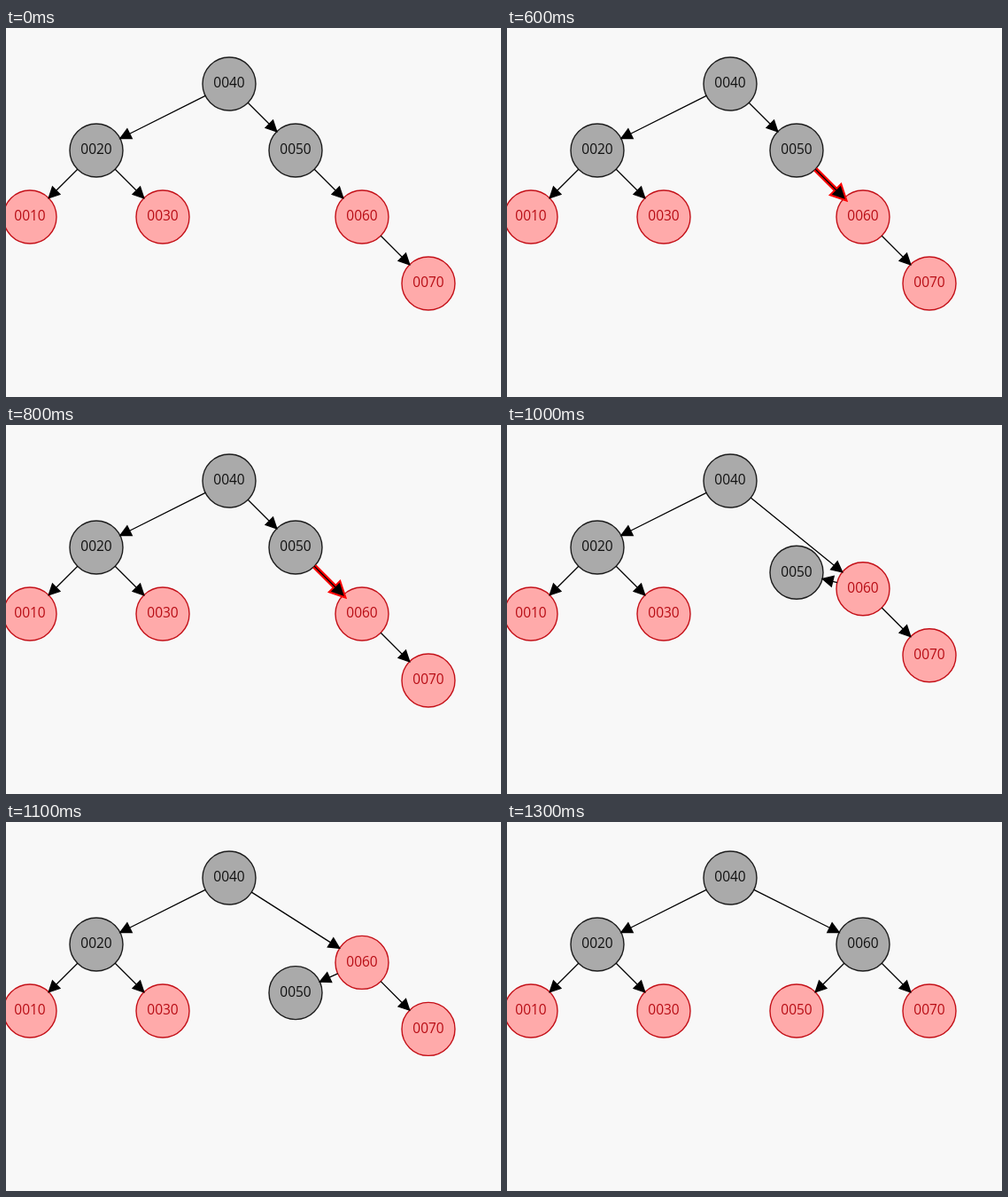
Write an HTML page that moves like this. It is 559 by 416 pixels and loops after 2200 ms.

```html
<!DOCTYPE html>
<html lang="en">
<head>
<meta charset="utf-8">
<title>Tree rotation</title>
<style>
  html, body { margin: 0; width: 100%; height: 100%; overflow: hidden; background: #f8f8f8; }
  svg { display: block; width: 559px; height: 416px; }
  text { font: 15.5px "Open Sans", "Noto Sans", sans-serif; fill: #111; }
  .node text { text-anchor: middle; }
  .node circle { fill: #aaa; stroke: #1c1c1c; stroke-width: 1.4; }
  .node.red circle { fill: #ffaaaa; stroke: #c41018; }
  .node.red text { fill: #b80c14; }
  .edge { fill: #000; stroke: #000; stroke-width: 1.3; }
  .glow { fill: #f00; stroke: #f00; stroke-width: 5.5; }
  #message { font-size: 14.5px; }
</style>
</head>
<body>
<svg id="stage" viewBox="0 0 559 416">
  <text id="message" x="-0.8" y="14.5">hild</text>
</svg>
<script>
const LOOP = 2200, TICK = 100;
const MESSAGE_ON = 200, GLOW_ON = 600, ROTATE = 817, ROTATE_TIME = 435, RECOLOR = 1300;
const RADIUS = 30, LEVEL = 75, HEAD = 12, HEAD_HALF = 6;

const stage = document.getElementById('stage');
const message = document.getElementById('message');

function add(parent, tag, attrs) {
  const el = document.createElementNS('http://www.w3.org/2000/svg', tag);
  for (const key in attrs) el.setAttribute(key, attrs[key]);
  return parent.appendChild(el);
}

// value: x, y, levels moved by the rotation, red
const nodes = {};
function addNode(value, x, y, levels, red) {
  const el = add(stage, 'g', { class: 'node' });
  add(el, 'circle', { r: RADIUS });
  add(el, 'text', { y: 4.3 }).textContent = '00' + value;
  nodes[value] = { el, x, y, top: y, levels, red };
}
addNode(40, 252, 63, 0, false);
addNode(20, 102, 138, 0, false);
addNode(10, 27, 213, 0, true);
addNode(30, 177, 213, 0, true);
addNode(50, 327, 138, 1, false);
addNode(60, 402, 213, -1, true);
addNode(70, 477, 288, -1, true);

const glow = add(stage, 'path', { class: 'glow' });
const fixedEdges = [[40, 20], [20, 10], [20, 30], [60, 70]];
const edgesBefore = [...fixedEdges, [40, 50], [50, 60]];
const edgesAfter = [...fixedEdges, [40, 60], [60, 50]];
const edgePaths = edgesBefore.map(() => add(stage, 'path', { class: 'edge' }));

function arrow([from, to]) {
  const a = nodes[from], b = nodes[to];
  const dist = Math.hypot(b.x - a.x, b.y - a.y);
  const ux = (b.x - a.x) / dist, uy = (b.y - a.y) / dist;
  const point = (along, side) =>
    `${(a.x + ux * along - uy * side).toFixed(2)} ${(a.y + uy * along + ux * side).toFixed(2)}`;
  const tip = dist - RADIUS, base = tip - HEAD;
  return `M${point(RADIUS, 0)}L${point(base, 0)}` +
    `M${point(tip, 0)}L${point(base, HEAD_HALF)}L${point(base, -HEAD_HALF)}Z`;
}

function draw(time) {
  const progress = Math.min(1, Math.max(0, (time - ROTATE) / ROTATE_TIME));
  const eased = (1 - Math.cos(Math.PI * progress)) / 2;
  const recolored = time >= RECOLOR;

  for (const value in nodes) {
    const node = nodes[value];
    node.y = node.top + node.levels * LEVEL * eased;
    const swaps = recolored && (value === '50' || value === '60');
    node.el.setAttribute('transform', `translate(${node.x} ${node.y.toFixed(2)})`);
    node.el.classList.toggle('red', node.red !== swaps);
  }

  const edges = time < ROTATE ? edgesBefore : edgesAfter;
  edges.forEach((edge, i) => edgePaths[i].setAttribute('d', arrow(edge)));
  glow.setAttribute('d', time >= GLOW_ON && time < ROTATE ? arrow([50, 60]) : '');
  message.style.display = time >= MESSAGE_ON && time < GLOW_ON ? '' : 'none';
}

// The picture advances in hard ticks.
const start = performance.now();
function frame() {
  const time = (performance.now() - start) % LOOP;
  draw(Math.floor(time / TICK) * TICK);
  requestAnimationFrame(frame);
}
frame();
</script>
</body>
</html>
```
